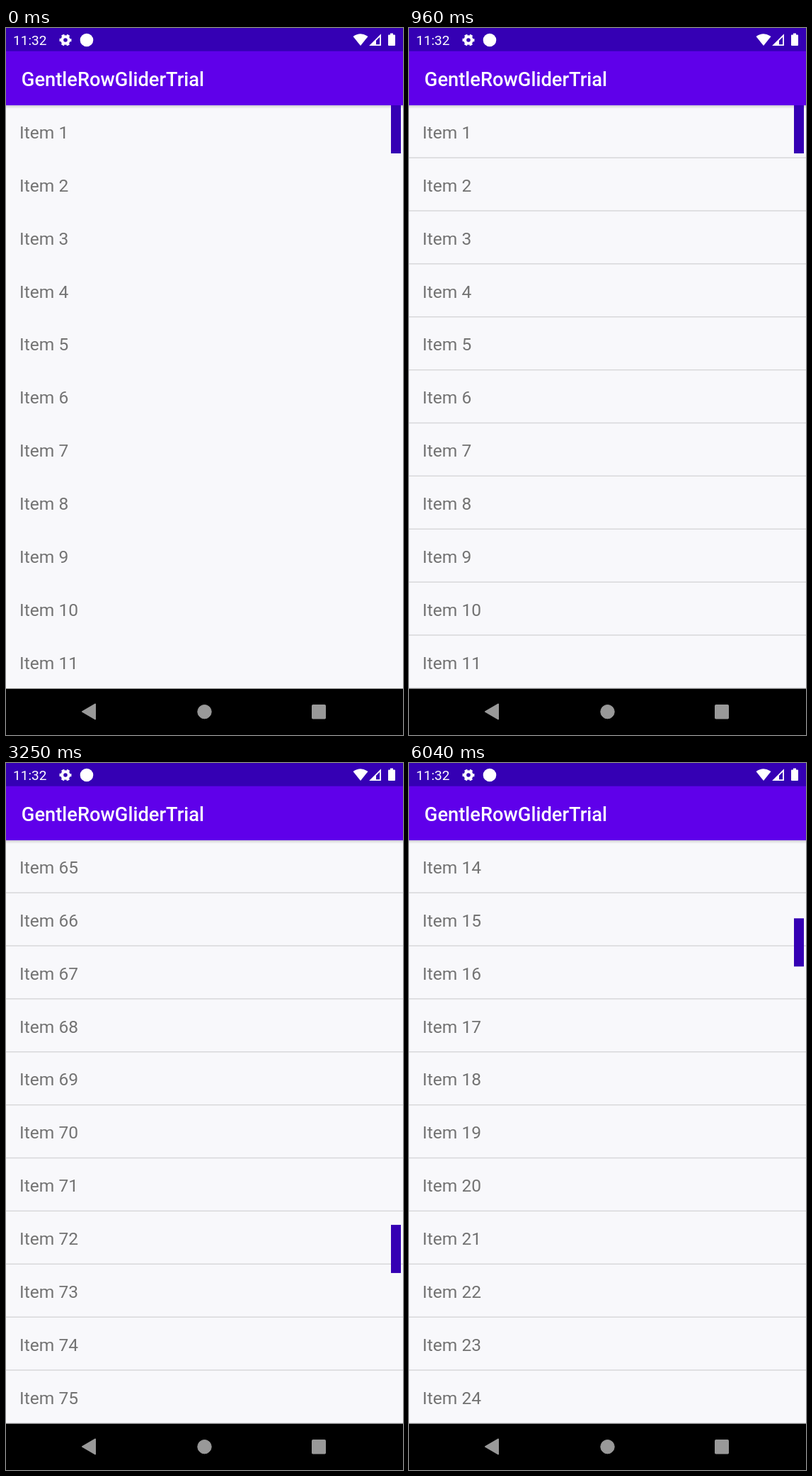
An HTML page for the animation above (6080 ms loop, 561 by 998 pixels).

```html
<!DOCTYPE html>
<html lang="en">
<head>
<meta charset="utf-8">
<title>List scrolling</title>
<style>
  html, body { margin: 0; width: 100%; height: 100%; overflow: hidden; background: #f8f8fb; }
  svg { display: block; font-family: Roboto, sans-serif; }
  #rows text { font-size: 24.57px; fill: #737373; }
  #rows rect { fill: #d6d6d8; }
</style>
</head>
<body>
<svg width="561" height="998" viewBox="0 0 561 998">
  <defs>
    <linearGradient id="shadow" x2="0" y2="1">
      <stop stop-color="#000" stop-opacity=".16"/>
      <stop offset="1" stop-color="#000" stop-opacity="0"/>
    </linearGradient>
  </defs>
  <rect width="561" height="998" fill="#f8f8fb"/>
  <g id="rows"></g>
  <rect y="109" width="561" height="5" fill="url(#shadow)"/>
  <rect id="thumb" x="544" width="14" height="68" fill="#3500b4"/>

  <rect width="561" height="33" fill="#3500b4"/>
  <rect y="32.7" width="561" height="76.4" fill="#5f00ea"/>
  <g fill="#fff">
    <text x="10" y="24" font-size="19.1">11:32</text>
    <text x="21.8" y="81.7" font-size="27.3" font-weight="500">GentleRowGliderTrial</text>
    <g fill="none" stroke="#fff">
      <circle cx="84" cy="17" r="4.8" stroke-width="4"/>
      <circle cx="84" cy="17" r="7.3" stroke-width="2.4" stroke-dasharray="4.2 3.444" stroke-dashoffset="2.1"/>
    </g>
    <circle cx="114" cy="17" r="9.3"/>
    <path d="M490.5 12Q501 4.500 511.500 12L501 25Z"/>
    <path d="M529 10.500V24.200H515.300Z" fill="none" stroke="#fff" stroke-width="1.8"/>
    <path d="M523 16.500V24H515Z"/>
    <path d="M543 7.500h4v2h2a1 1 0 0 1 1 1v13.500a1 1 0 0 1-1 1h-8a1 1 0 0 1-1-1v-13.500a1 1 0 0 1 1-1h2z"/>
  </g>

  <rect y="932.6" width="561" height="65.400"/>
  <g fill="#999" stroke="#999" stroke-linejoin="round">
    <path d="M108 965L126 954.500V975.500Z" stroke-width="2"/>
    <circle cx="280.500" cy="965.200" r="9.700"/>
    <rect x="432.500" y="955.500" width="19" height="19.500" rx="1"/>
  </g>
</svg>
<script>
const LOOP = 6080, FRAME = 1000 / 24;
const TOP = 109, PITCH = 74.87, VISIBLE = 11;
const THUMB_STEP = 755 / 89;

// Drag path: time in ms, first visible item, speed in items per ms
const path = [
  [1650, 1, 0], [2420, 28, .046], [3250, 65, .038],
  [3650, 74, 0], [4170, 57, -.05], [4950, 14, 0]
];

const rows = document.getElementById('rows');
const thumb = document.getElementById('thumb');

function add(tag, attributes) {
  const node = document.createElementNS('http://www.w3.org/2000/svg', tag);
  for (const key in attributes) node.setAttribute(key, attributes[key]);
  return rows.appendChild(node);
}

const labels = [], dividers = [];
for (let i = 0; i < VISIBLE; i++) {
  labels.push(add('text', { x: 19.1, y: TOP + 47 + i * PITCH }));
  dividers.push(add('rect', { y: TOP - 1.4 + (i + 1) * PITCH, width: 561, height: 1.4 }));
}

function firstItem(t) {
  if (t <= path[0][0]) return path[0][1];
  const end = path.findIndex(point => point[0] > t);
  if (end < 0) return path[path.length - 1][1];
  const [t0, p0, v0] = path[end - 1], [t1, p1, v1] = path[end];
  const span = t1 - t0, u = (t - t0) / span, w = 1 - u;
  return Math.round(
    p0 * w * w * (1 + 2 * u) + p1 * u * u * (3 - 2 * u) +
    span * u * w * (v0 * w - v1 * u)
  );
}

function draw(now) {
  const t = Math.floor((now % LOOP + 5) / FRAME) * FRAME;
  const first = firstItem(t);
  labels.forEach((label, i) => {
    const text = 'Item ' + (first + i);
    if (label.textContent !== text) label.textContent = text;
  });
  dividers.forEach(line => line.setAttribute('opacity', Math.min(1, t / 200)));
  thumb.setAttribute('y', TOP + (first - 1) * THUMB_STEP);
  requestAnimationFrame(draw);
}

const start = performance.now();
requestAnimationFrame(function begin() {
  draw(0);
});
const baseDraw = draw;
draw = now => baseDraw(Math.max(0, now - start));
</script>
</body>
</html>
```
